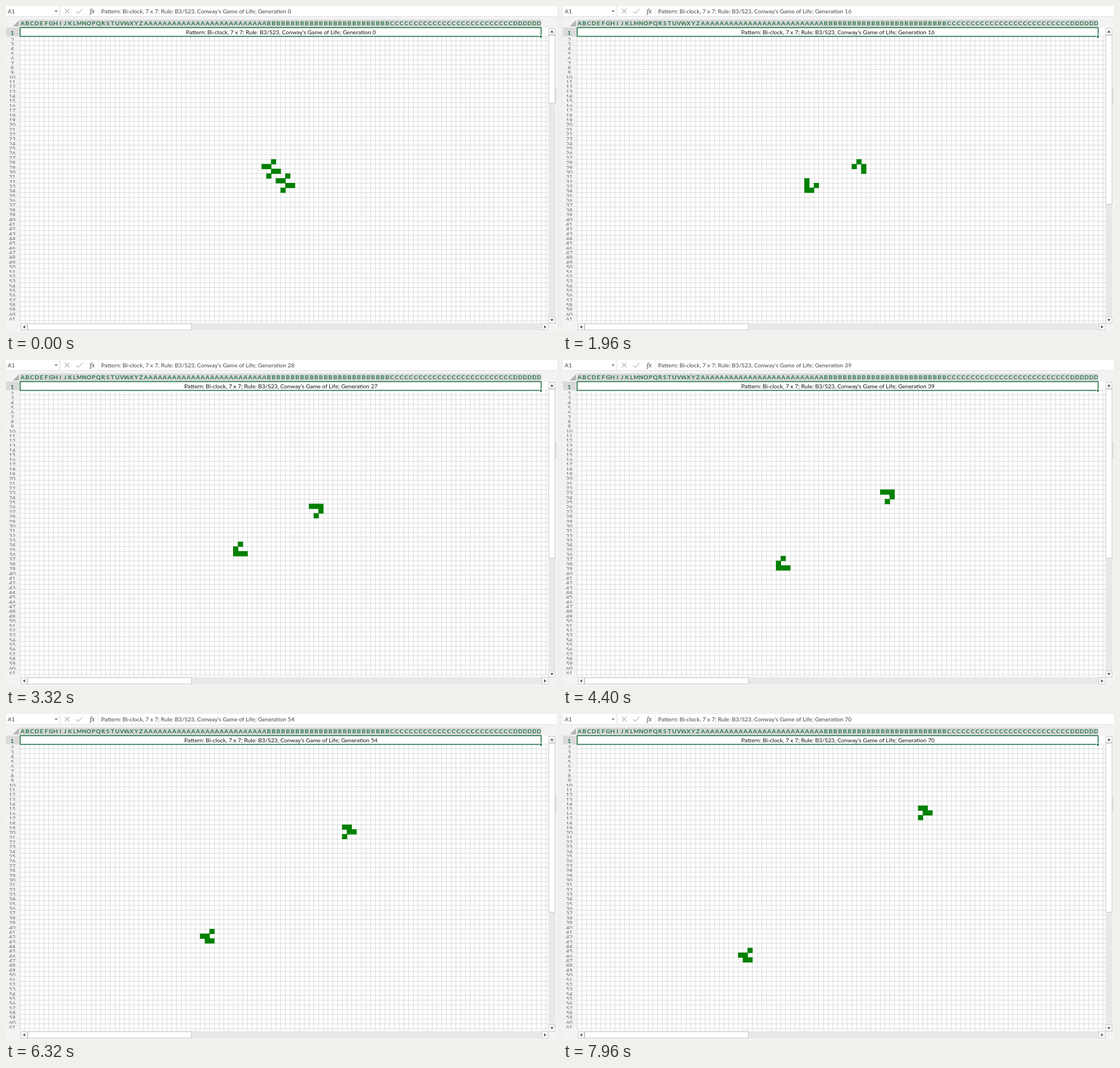
Recreate the animation shown at these times as an HTML page with a canvas. Size 973 by 575 pixels, loop 8 s.

```html
<!DOCTYPE html>
<html lang="en">
<head>
<meta charset="utf-8">
<title>Game of Life in a spreadsheet</title>
<style>
  html, body { margin: 0; width: 100%; height: 100%; overflow: hidden; background: #f3f3f3; }
  canvas { display: block; }
</style>
</head>
<body>
<canvas id="stage" width="973" height="575"></canvas>
<script>
const stage = document.getElementById('stage');
const GREEN = '#217346', CHROME = '#f3f3f3', LINE = '#d0d0d0';
const LOOP = 8000, FRAME = 80, LEAD = 0.33;
const COLUMNS = 110, LAST_ROW = 62;
const PITCH = 920 / COLUMNS, LINE_WIDTH = 0.8;
const SEED = ['..#....', '##.....', '..##...', '.#...#.', '...##..', '.....##', '....#..'];
const SEED_COL = 51, SEED_ROW = 28;

// The sheet recalculates at an uneven pace: [time in ms, generation].
const PACE = [[0, 0], [1080, 9.3], [1960, 16.8], [3320, 27.8], [4400, 39.2],
              [6320, 54.2], [7960, 70.1], [8000, 70.5]];

// Left and top edges of the grid lines; the zoomed sheet falls between pixels.
const colX = col => 24.65 + col * PITCH;
const rowY = row => 52.75 + (row - 2) * PITCH;

function nextGeneration(live) {
  const neighbours = new Map();
  for (const key of live) {
    const [x, y] = key.split(',').map(Number);
    for (let dx = -1; dx <= 1; dx++)
      for (let dy = -1; dy <= 1; dy++) {
        if (!dx && !dy) continue;
        const k = `${x + dx},${y + dy}`;
        neighbours.set(k, (neighbours.get(k) || 0) + 1);
      }
  }
  const born = [...neighbours].filter(([k, n]) => n === 3 || (n === 2 && live.has(k)));
  return new Set(born.map(([k]) => k));
}

function buildGenerations(count) {
  const seed = new Set();
  SEED.forEach((line, y) => [...line].forEach((ch, x) => {
    if (ch === '#') seed.add(`${SEED_COL + x},${SEED_ROW + y}`);
  }));
  const list = [seed];
  while (list.length < count) list.push(nextGeneration(list[list.length - 1]));
  return list.map(live => [...live].map(k => k.split(',').map(Number)));
}

const generations = buildGenerations(73);

function rect(g, x, y, w, h, fill, border) {
  g.fillStyle = fill;
  g.fillRect(x, y, w, h);
  if (border) {
    g.strokeStyle = border;
    g.lineWidth = 1;
    g.strokeRect(x + 0.5, y + 0.5, w - 1, h - 1);
  }
}

function label(g, text, x, y, color, font, align = 'left') {
  g.font = font;
  g.fillStyle = color;
  g.textAlign = align;
  g.fillText(text, x, y);
}

function polygon(g, color, ...points) {
  g.fillStyle = color;
  g.beginPath();
  points.forEach(([x, y]) => g.lineTo(x, y));
  g.fill();
}

function polyline(g, color, ...points) {
  g.strokeStyle = color;
  g.lineWidth = 1.1;
  g.beginPath();
  points.forEach(([x, y], i) => i ? g.lineTo(x, y) : g.moveTo(x, y));
  g.stroke();
}

function clipped(g, x, y, w, h, draw) {
  g.save();
  g.beginPath();
  g.rect(x, y, w, h);
  g.clip();
  draw();
  g.restore();
}

const TEXT = '10.16px Lato, sans-serif';
const BOLD = 'bold 10.16px Lato, sans-serif';

function columnName(i) {
  const letter = n => String.fromCharCode(65 + n);
  return i < 26 ? letter(i) : letter(Math.floor(i / 26) - 1) + letter(i % 26);
}

function drawFormulaBar(g) {
  rect(g, 0, 0, 93, 18, '#fff');
  rect(g, 97, 0, 65, 18, '#fff');
  rect(g, 164, 0, 809, 18, '#fff');
  rect(g, 0, 18, 973, 1, '#e1e1e1');
  label(g, 'A1', 3, 13, '#444', TEXT);
  polygon(g, '#666', [86, 8], [91, 8], [88.5, 11]);
  polyline(g, '#b0b0b0', [104, 5], [112, 13]);
  polyline(g, '#b0b0b0', [112, 5], [104, 13]);
  polyline(g, '#b0b0b0', [124, 9.5], [128, 13], [135, 5]);
  label(g, 'fx', 148, 12.5, '#333', 'italic 11.5px "Liberation Serif", serif');
}

function drawHeaders(g) {
  polygon(g, '#b4b4b4', [23, 25], [23, 36], [12, 36]);
  rect(g, 25, 24, 920, 13, '#d9d9d9');
  for (let i = 0; i < COLUMNS; i++) {
    const x = colX(i), name = columnName(i);
    rect(g, x, 24, LINE_WIDTH, 13, '#cbcbcb');
    clipped(g, x, 24, PITCH, 13, () => name.length === 1
      ? label(g, name, x + 0.4 + PITCH / 2, 34.3, GREEN, BOLD, 'center')
      : label(g, name, x + 1.3, 34.3, GREEN, BOLD));
  }
  rect(g, 0, 38, 24, 16, '#d9d9d9');
  label(g, '1', 11, 50.5, GREEN, BOLD, 'center');
  for (let row = 2; row < LAST_ROW; row++) {
    const y = rowY(row);
    rect(g, 0, y, 24, LINE_WIDTH, '#e4e4e4');
    clipped(g, 0, y, 24, PITCH, () =>
      label(g, row, 11, y + 10, '#666', '9.8px Lato, sans-serif', 'center'));
  }
}

function drawGrid(g) {
  rect(g, 25, 38, 933, 520, '#fff');
  for (let i = 0; colX(i) < 957; i++) rect(g, colX(i), 54, LINE_WIDTH, 504, LINE);
  for (let row = 2; row <= LAST_ROW; row++) rect(g, 25, rowY(row), 933, LINE_WIDTH, LINE);
}

function drawScrollbars(g) {
  const border = '#c6c6c6', arrow = '#666';
  rect(g, 958, 39, 12, 520, '#e8e8e8');
  rect(g, 958, 39, 12, 12, '#fff', border);
  rect(g, 958, 548, 12, 12, '#fff', border);
  polygon(g, arrow, [961, 47], [967, 47], [964, 42.5]);
  polygon(g, arrow, [961, 552], [967, 552], [964, 556.5]);
  rect(g, 26, 560, 932, 12, '#e8e8e8');
  rect(g, 26, 560, 12, 12, '#fff', border);
  rect(g, 946, 560, 12, 12, '#fff', border);
  rect(g, 38, 560, 290, 12, '#fff', border);
  polygon(g, arrow, [34, 563], [34, 569], [29.5, 566]);
  polygon(g, arrow, [950, 563], [950, 569], [954.5, 566]);
  rect(g, 970, 145, 3, 27, '#f3f3f3', '#dcdcdc');
}

function drawSheet() {
  const sheet = document.createElement('canvas');
  sheet.width = 973;
  sheet.height = 575;
  const g = sheet.getContext('2d');
  rect(g, 0, 0, 973, 575, CHROME);
  drawFormulaBar(g);
  drawGrid(g);
  drawHeaders(g);
  drawScrollbars(g);
  g.strokeStyle = GREEN;
  g.lineWidth = 1.6;
  g.strokeRect(25, 38.2, 920, 15.4);
  rect(g, 942, 51, 5, 5, '#fff');
  rect(g, 943, 52, 3, 4, GREEN);
  return sheet;
}

function progressAt(time) {
  let i = 0;
  while (i < PACE.length - 2 && time >= PACE[i + 1][0]) i++;
  const [[t0, g0], [t1, g1]] = [PACE[i], PACE[i + 1]];
  const sampled = Math.floor((time - t0) / FRAME) * FRAME;
  return g0 + (g1 - g0) * sampled / (t1 - t0);
}

const caption = n => `Pattern: Bi-clock, 7 x 7; Rule: B3/S23, Conway's Game of Life; Generation ${n}`;

// Repaints are not atomic: after even generations the cells run ahead
// of the text, after odd ones the formula bar does.
function cellsAt(generation, early) {
  const now = generations[generation];
  if (!early) return now;
  const next = generations[generation + 1];
  const front = Math.max(...next.map(([x]) => x));
  return [...next.filter(([x]) => x < front), ...now.filter(([x]) => x >= front)];
}

const sheet = drawSheet();
const ctx = stage.getContext('2d');

function render(time) {
  const progress = progressAt(time);
  const generation = Math.floor(progress);
  const early = progress - generation >= 1 - LEAD;
  const odd = generation % 2 === 1;
  const cellSize = PITCH + LINE_WIDTH;

  ctx.drawImage(sheet, 0, 0);
  rect(ctx, 958, 51, 12, time < FRAME ? 121 : 299, '#fff', '#c6c6c6');
  for (const [col, row] of cellsAt(generation, early && !odd))
    rect(ctx, colX(col), rowY(row), cellSize, cellSize, '#008000');
  label(ctx, caption(generation + (early && odd ? 1 : 0)), 168, 12.5, '#444', TEXT);
  label(ctx, caption(generation), 485.5, 50.3, '#111', TEXT, 'center');
}

function tick() {
  render(performance.now() % LOOP);
  requestAnimationFrame(tick);
}
tick();
</script>
</body>
</html>
```
